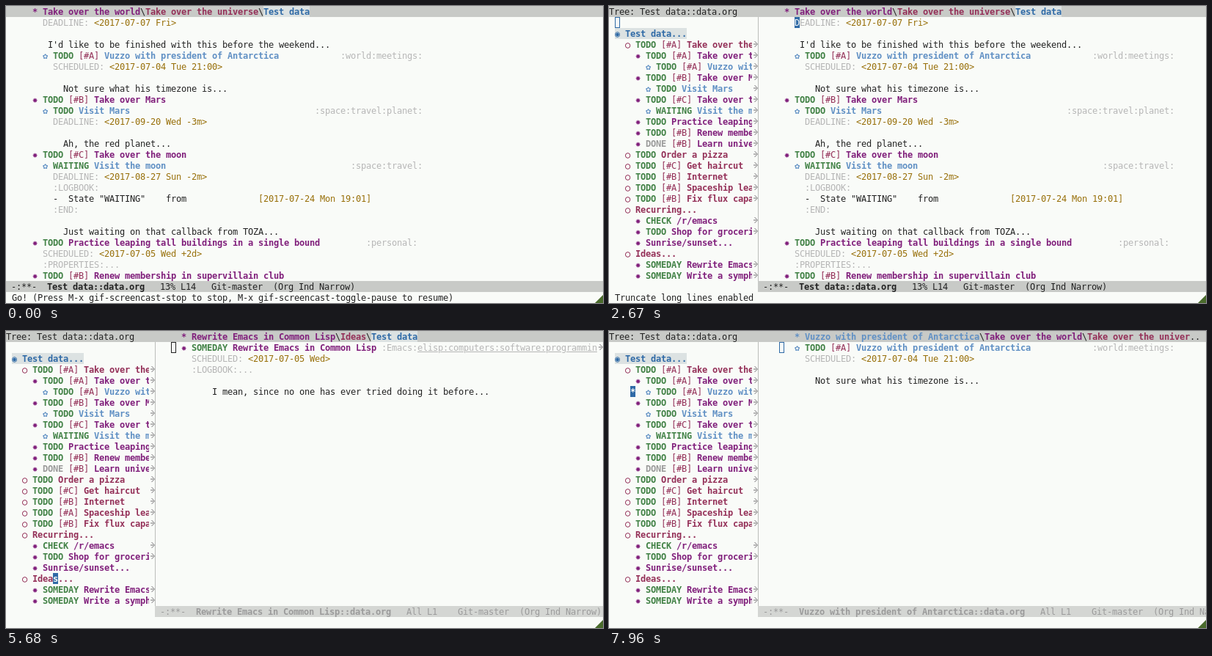
Animation of 814x405 px, one loop 8000 ms. Source, as an HTML page:

```html
<!DOCTYPE html>
<html lang="en">
<head>
<meta charset="utf-8">
<title>Outline sidebar</title>
<style>
html, body { margin: 0; width: 100%; height: 100%; overflow: hidden; background: #f9fbf8; }
/* The 16px line puts the baseline 12px below the top of each 15px row. */
#stage {
  position: relative; width: 814px; height: 405px; overflow: hidden; color: #222;
  font: 12px/16px "DejaVu Sans Mono", monospace; font-variant-ligatures: none;
}
#stage div, #stage span, #stage svg { position: absolute; box-sizing: border-box; }
#stage span { white-space: pre; height: 15px; }
.bar { height: 15px; background: #c8cac7; overflow: hidden; }
.dim { background: #d4d6d3; color: #9b9b9b; }
.s1, .s2, .s3, .s4, .sh, .st, .sd, .sb { font-weight: bold; }
.s1, .sh { color: #2f6aa6; }
.sh { background: #dce2e2; }
.s2 { color: #943058; }
.s3 { color: #801f7b; }
.s4 { color: #6090c4; }
.st { color: #428246; }
.sd { color: #9b9b9b; }
.sp { color: #943058; }
.sg, .su { color: #b6b6b6; }
.su { text-decoration: underline; }
.sy { color: #98700a; }
.sm { color: #3f7ba8; }
.cursor { width: 7px; height: 15px; }
.solid { background: #2f6aa6; color: #f9fbf8; }
.hollow { border: 1px solid #2f6aa6; }
.dark { border: 1px solid #222; }
</style>
</head>
<body>
<div id="stage"></div>
<script>
const LOOP = 8000, CELL = 7, ROW = 15, SPLIT = 203;
const stage = document.getElementById('stage');

// Fit the font's advance to the character grid.
const probe = document.createElement('span');
probe.textContent = 'M'.repeat(100);
stage.append(probe);
const advance = probe.getBoundingClientRect().width / 100;
stage.style.letterSpacing = (CELL - advance) + 'px';

const esc = s => s.replace(/&/g, '&amp;').replace(/</g, '&lt;');

// Markup: {cText} sets text in style c, {@n} jumps to column n.
function line(src, x = 0, y = 0) {
  let col = 0, out = '';
  for (const [, style, inner, plain] of src.matchAll(/\{(.)(.*?)\}|([^{]+)/g)) {
    if (style === '@') { col = +inner; continue; }
    const text = inner ?? plain;
    const lead = style === 'h' ? 0 : text.length - text.trimStart().length;
    if (text.trim()) {
      const cls = style ? ` class="s${style}"` : '';
      out += `<span${cls} style="left:${x + (col + lead) * CELL}px;top:${y}px">${esc(text.slice(lead))}</span>`;
    }
    col += text.length;
  }
  return out;
}

const lines = (rows, x) => rows.map((r, i) => line(r, x, (i + 1) * ROW)).join('');
const box = (x, y, w, h, html, cls = '') =>
  `<div class="${cls}" style="left:${x}px;top:${y}px;width:${w}px;height:${h}px;overflow:hidden">${html}</div>`;
const bar = (x, row, w, html, cls = '') => box(x, row * ROW, w, ROW, html, 'bar ' + cls);
const cursor = (x, row, kind, ch = '') =>
  `<span class="cursor ${kind}" style="left:${x}px;top:${row * ROW}px">${ch}</span>`;
const arrow = (x, row) =>
  `<svg width="8" height="8" style="left:${x}px;top:${row * ROW + 3}px" fill="#b6b6b6" shape-rendering="crispEdges">` +
  '<path d="M3 0h2v1h1v1h1v1h1v2h-1v1h-1v1h-1v1h-2v-1h1v-1h1v-1h-3v-2h3v-1h-1v-1h-1z"/></svg>';

const CALL = 'Vuzzo with president of Antarctica';
const LISP = 'Rewrite Emacs in Common Lisp';
const callRow = `{4✿} {tTODO} {p[#A]} {4${CALL}}{@64}{g:world:meetings:}`;
const callDate = '{gSCHEDULED:} {y<2017-07-04 Tue 21:00>}';
const lispRows = [
  `    {3✸} {tSOMEDAY} {3${LISP}} {g:Emacs:}{uelisp:computers:software:programmin}`,
  '      {gSCHEDULED:} {y<2017-07-05 Wed>}',
  '      {g:LOGBOOK:...}', '',
  '          I mean, since no one has ever tried doing it before...'
];

const sheets = {
  world: {
    head: '    {3*} {3Take over the world}\\{2Take over the universe}\\{hTest data}',
    name: 'Test data', pos: '13% L14   ',
    rows: [
      '      {gDEADLINE:} {y<2017-07-07 Fri>}', '',
      "       I'd like to be finished with this before the weekend...",
      '      ' + callRow,
      '        ' + callDate, '',
      '          Not sure what his timezone is...',
      '    {3✸} {tTODO} {p[#B]} {3Take over Mars}',
      '      {4✿} {tTODO} {4Visit Mars}{@59}{g:space:travel:planet:}',
      '        {gDEADLINE:} {y<2017-09-20 Wed -3m>}', '',
      '          Ah, the red planet...',
      '    {3✸} {tTODO} {p[#C]} {3Take over the moon}',
      '      {4✿} {tWAITING} {4Visit the moon}{@66}{g:space:travel:}',
      '        {gDEADLINE:} {y<2017-08-27 Sun -2m>}',
      '        {g:LOGBOOK:}',
      '        -  State "WAITING"    from{@48}{y[2017-07-24 Mon 19:01]}',
      '        {g:END:}', '',
      '          Just waiting on that callback from TOZA...',
      '    {3✸} {tTODO} {3Practice leaping tall buildings in a single bound}{@69}{g:personal:}',
      '      {gSCHEDULED:} {y<2017-07-05 Wed +2d>}',
      '      {g:PROPERTIES:...}',
      '    {3✸} {tTODO} {p[#B]} {3Renew membership in supervillain club}'
    ]
  },
  lisp: {
    head: `    {3*} {3${LISP}}\\{2Ideas}\\{hTest data}`,
    name: LISP, rows: lispRows, arrowRow: 1
  },
  ideas: {
    head: '  {2*} {2Ideas}\\{hTest data}',
    name: 'Ideas', arrowRow: 3,
    rows: [
      '  {2○} {2Ideas}', '    {g:PROPERTIES:...}', ...lispRows,
      '    {3✸} {tSOMEDAY} {3Write a symphony}{@70}{g:music:}',
      '      {g:PROPERTIES:...}', '',
      "      I don't know when I'll get to this, so it's undated."
    ]
  },
  call: {
    head: `      {4*} {4${CALL}}\\{3Take over the world}\\{2Take over the univer}..`,
    name: CALL,
    rows: ['      ' + callRow, '        ' + callDate, '', '          Not sure what his timezone is...']
  }
};

function sheet(key, x, dim) {
  const { head, name, rows, arrowRow, pos = 'All L1    ' } = sheets[key];
  const w = 814 - x;
  return bar(x, 0, w, line(head, 8)) +
    box(x, 0, w, 375, lines(rows, 8)) +
    (arrowRow ? arrow(806, arrowRow) : '') +
    bar(x, 25, w, line(` -:**-  {b${name}::data.org}   ${pos}Git-master  (Org Ind Narrow)`), dim ? 'dim' : '');
}

// A trailing ">" marks a truncated tree row.
const treeRows = [
  '', '{h◉ Test data...}',
  '  {2○} {tTODO} {p[#A]} {2Take over the universe}>',
  '    {3✸} {tTODO} {p[#A]} {3Take over the world}>',
  `      {4✿} {tTODO} {p[#A]} {4${CALL}}>`,
  '    {3✸} {tTODO} {p[#B]} {3Take over Mars}>',
  '      {4✿} {tTODO} {4Visit Mars}>',
  '    {3✸} {tTODO} {p[#C]} {3Take over the moon}>',
  '      {4✿} {tWAITING} {4Visit the moon}>',
  '    {3✸} {tTODO} {3Practice leaping}>',
  '    {3✸} {tTODO} {p[#B]} {3Renew membership}>',
  '    {3✸} {dDONE} {p[#B]} {3Learn universal}>',
  '  {2○} {tTODO} {2Order a pizza}>',
  '  {2○} {tTODO} {p[#C]} {2Get haircut}>',
  '  {2○} {tTODO} {p[#B]} {2Internet}>',
  '  {2○} {tTODO} {p[#A]} {2Spaceship lease}>',
  '  {2○} {tTODO} {p[#B]} {2Fix flux capacitor}>',
  '  {2○} {2Recurring...}',
  '    {3✸} {tCHECK} {3/r/emacs}>',
  '    {3✸} {tTODO} {3Shop for groceries}>',
  '    {3✸} {3Sunrise/sunset...}',
  '  {2○} {2Ideas...}',
  `    {3✸} {tSOMEDAY} {3${LISP}}>`,
  '    {3✸} {tSOMEDAY} {3Write a symphony}>'
];
const tree = bar(0, 0, SPLIT, line('Tree: Test data::data.org')) +
  box(0, 0, 195, 390, lines(treeRows.map(r => r.replace(/>$/, '')), 8)) +
  treeRows.map((r, i) => r.endsWith('>') ? arrow(195, i + 1) : '').join('') +
  `<div style="left:${SPLIT}px;top:15px;width:1px;height:360px;background:#bcbebb"></div>`;

const grip = '<svg width="11" height="11" style="left:803px;top:394px"><path d="M11 0V11H0z" fill="#4a6b2c"/></svg>';
const echo = src => line(src, 8, 390);
const split = (key, dim, extra) => tree + sheet(key, SPLIT, dim) + extra;

const COMMAND = 'org-sidebar-tree';
const full = sheet('world', 0);
const typing = n => full + cursor(50, 1, 'hollow') +
  echo(`{mM-x} ${COMMAND.slice(0, n)}`) + cursor(36 + n * CELL, 26, 'solid');

const keys = [1020, 1160, 1240, 1400, 1500, 1600, 1760, 1920, 2210];
const counts = [7, 8, 9, 10, 11, 12, 13, 15, 16];

const states = [
  [0, full + echo('Go! (Press M-x gif-screencast-stop to stop, M-x gif-screencast-toggle-pause to resume)')],
  ...Array.from({ length: 7 }, (_, n) => [Math.round(360 + n * 500 / 6), typing(n)]),
  ...keys.map((t, i) => [t, typing(counts[i])]),
  [2670, split('world', false, cursor(8, 1, 'hollow') + cursor(253, 1, 'solid', 'D') + echo('Truncate long lines enabled'))],
  [3920, split('world', true, cursor(253, 1, 'hollow') + cursor(134, 23, 'solid', '<b>i</b>'))],
  [4380, split('lisp', true, cursor(225, 1, 'dark'))],
  [5680, split('lisp', true, cursor(225, 1, 'dark') + cursor(64, 22, 'solid', '<b>s</b>'))],
  [6210, split('ideas', true, cursor(218, 1, 'hollow'))],
  [7460, split('ideas', true, cursor(218, 1, 'hollow') + cursor(141, 5, 'solid', '<b>u</b>'))],
  [7960, split('call', true, cursor(232, 1, 'hollow') + cursor(29, 5, 'solid', '<b>*</b>'))]
];

let shown = -1;
const start = performance.now();
function draw() {
  const t = (performance.now() - start) % LOOP;
  const now = states.findLastIndex(([at]) => at <= t);
  if (now !== shown) {
    shown = now;
    stage.innerHTML = states[now][1] + grip;
  }
  requestAnimationFrame(draw);
}
draw();
</script>
</body>
</html>
```
